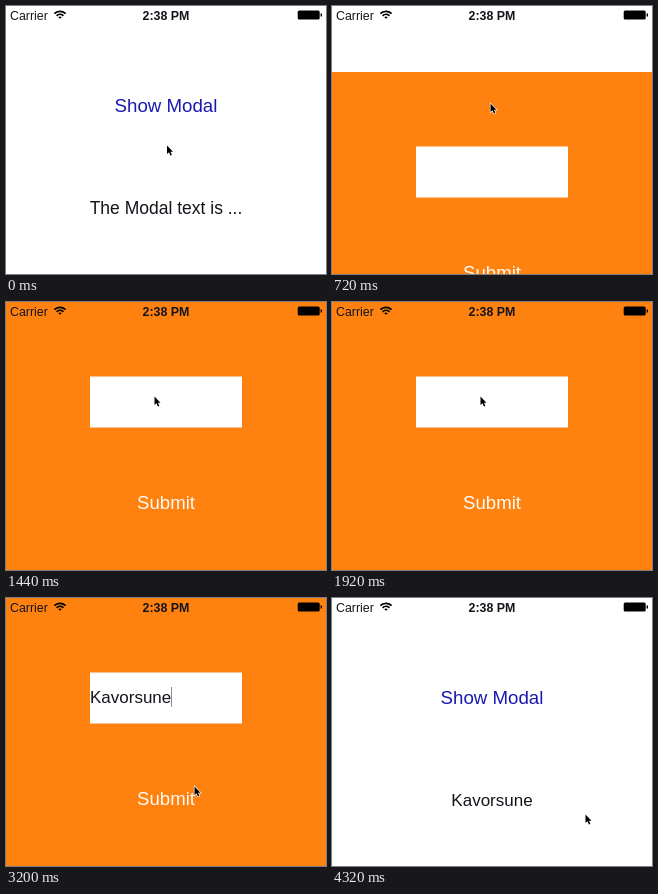
An HTML page with a canvas that plays this animation: 320x268 px, repeating every 4.96 s.

```html
<!DOCTYPE html>
<html lang="en">
<head>
<meta charset="utf-8">
<title>Modal demo</title>
<style>
  html, body { margin: 0; width: 100%; height: 100%; overflow: hidden; background: #fff; }
  canvas { display: block; }
</style>
</head>
<body>
<canvas id="stage" width="320" height="268"></canvas>
<script>
const ctx = document.getElementById('stage').getContext('2d');
const LOOP = 4960, STEP = 80, SCREEN = 568;
const OPEN = 552, FOCUS = 2000, RESUME = 2480, CLOSE = 3626.4;
const ENTRY = 'Kavorsune', FIRST_BURST = 4;
const INK = '#14141c', ORANGE = '#ff8210';
const ARROW = new Path2D('M0 0V8.4L2 6.7L3.4 10L4.9 9.4L3.5 6.2H6Z');

const clamp = (v, lo, hi) => Math.min(hi, Math.max(lo, v));

// Each move eases the pointer from wherever it rests to a new spot
const MOVES = [
  { from: 80, to: 480, x: 158.5, y: 97.5 },
  { from: 1200, to: 1440, x: 148.5, y: 94.5 },
  { from: 3040, to: 3200, x: 188.5, y: 188.5 },
  { from: 3200, to: 3600, x: 153.5, y: 203.5 },
  { from: 4160, to: 4320, x: 253.5, y: 216.5 }
];

function pointerAt(t) {
  let x = 161, y = 139.5;
  for (const move of MOVES) {
    const k = clamp((t - move.from) / (move.to - move.from), 0, 1);
    const eased = k * k * (3 - 2 * k);
    x += (move.x - x) * eased;
    y += (move.y - y) * eased;
  }
  return [x, y];
}

// Remaining distance of a critically damped spring
function spring(ms) {
  const x = Math.max(0, ms) * 0.022;
  return Math.exp(-x) * (1 + x);
}

function modalTop(t) {
  return Math.floor(SCREEN * (t < CLOSE ? spring(t - OPEN) : 1 - spring(t - CLOSE)));
}

// One key per step, in two bursts with a pause between them
function typedText(t) {
  const keysSince = start => Math.floor((t - start) / STEP);
  const count = clamp(keysSince(FOCUS), 0, FIRST_BURST) + Math.max(0, keysSince(RESUME));
  return ENTRY.slice(0, count);
}

function text(str, x, y, size, color, align = 'center', weight = '') {
  ctx.font = `${weight} ${size}px "Liberation Sans", Arial, sans-serif`;
  ctx.textAlign = align;
  ctx.fillStyle = color;
  ctx.fillText(str, x, y);
}

function rect(x, y, w, h, color) {
  ctx.fillStyle = color;
  ctx.fillRect(x, y, w, h);
}

function drawStatusBar() {
  text('Carrier', 4, 13.5, 12.4, INK, 'left');
  text('2:38 PM', 160, 13.5, 12.4, INK, 'center', 'bold');

  ctx.strokeStyle = '#000';
  ctx.lineWidth = 1.8;
  for (const r of [1.5, 4.6, 7.7]) {
    ctx.beginPath();
    ctx.arc(54, 13, r, -Math.PI * 0.76, -Math.PI * 0.24);
    ctx.stroke();
  }

  ctx.fillStyle = '#000';
  ctx.beginPath();
  ctx.roundRect(291.7, 4.6, 22, 8.8, 1.5);
  ctx.fill();
  rect(314.6, 7.5, 1.4, 3, '#000');
}

function drawModal(top, t) {
  rect(0, top, 320, SCREEN, ORANGE);
  rect(84, top + 74.5, 152, 51, '#fff');
  const typed = typedText(t);
  text(typed, 84, top + 105, 17, INK, 'left');
  if (t >= FOCUS) {
    rect(84 + Math.round(ctx.measureText(typed).width), top + 89, 1, 20, '#8a8a9a');
  }
  text('Submit', 160, top + 207, 18.6, '#fffaf2');
}

function drawPointer(x, y) {
  ctx.save();
  ctx.translate(x, y);
  ctx.strokeStyle = '#fff';
  ctx.lineWidth = 1.2;
  ctx.stroke(ARROW);
  ctx.fillStyle = '#000';
  ctx.fill(ARROW);
  ctx.restore();
}

function draw(t) {
  rect(0, 0, 320, 268, '#fff');
  text('Show Modal', 160, 106, 18.7, '#1a1aae');
  if (t < CLOSE) text('The Modal text is ...', 160, 207.5, 17.5, INK);
  else text(ENTRY, 160, 207.5, 17, INK);
  const top = modalTop(t);
  if (top < 268) drawModal(top, t);
  drawStatusBar();
  drawPointer(...pointerAt(t));
}

const start = performance.now();
function tick() {
  const t = (performance.now() - start) % LOOP;
  draw(Math.floor(t / STEP) * STEP);
  requestAnimationFrame(tick);
}
tick();
</script>
</body>
</html>
```
